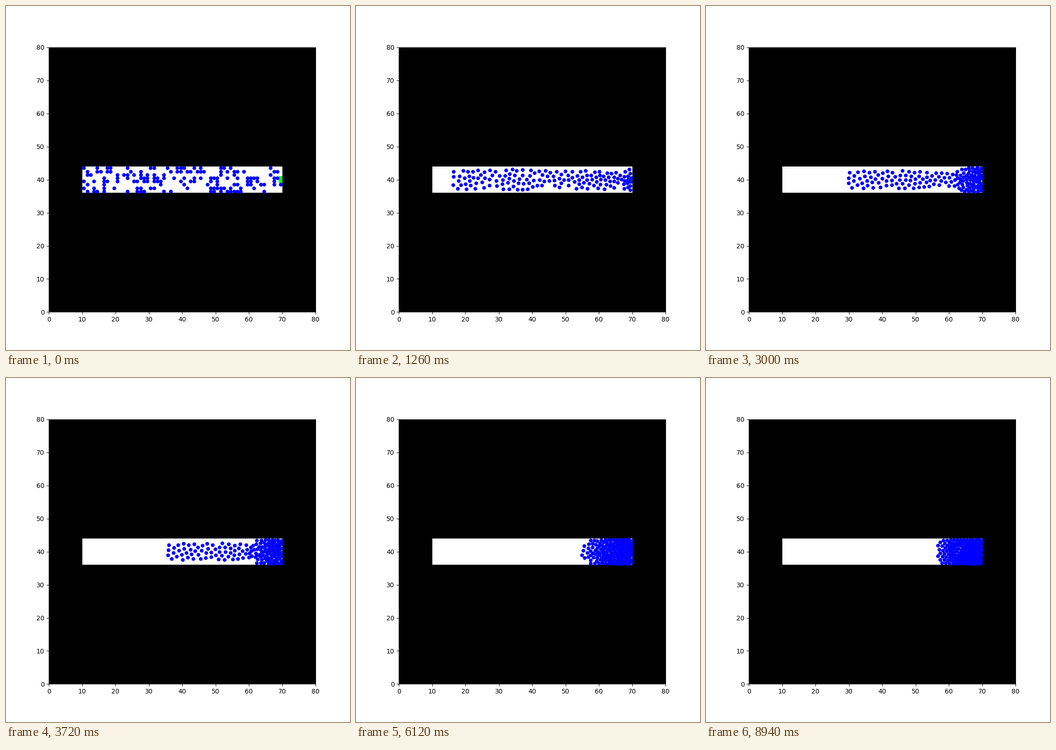
A matplotlib script for the animation above (9 s loop, 748x748 px).

```python
import matplotlib.pyplot as plt
import numpy as np
from matplotlib.animation import FuncAnimation
from matplotlib.patches import Rectangle

FRAMES, INTERVAL = 150, 60
SUBSTEPS = 8
STAGE = 748
LEFT, RIGHT, BOTTOM, TOP = 10, 70, 36, 44
GOAL = np.array([70.0, 40.0])

AGENTS = 147
SPEED = 0.495                 # cells per frame
RELAX = 9.2                   # frames needed to reach walking speed
DRIVE = SPEED / RELAX
BODY, BODY_RANGE = 1.12, 0.13
WALL, WALL_RANGE = 0.65, 0.12
EXIT_EVERY, EXIT_REACH = 8, 0.9


def push(dist, size, reach):
    return DRIVE * np.exp(np.minimum((size - dist) / reach, 5))


def wall_push(dist):
    return push(dist, WALL, WALL_RANGE)


def start_cells():
    rng = np.random.default_rng(7)
    width, height = RIGHT - LEFT, TOP - BOTTOM
    cells = rng.choice(width * height, AGENTS, replace=False)
    return np.column_stack([LEFT + 0.5 + cells % width,
                            BOTTOM + 0.5 + cells // width])


def acceleration(pos, vel):
    to_goal = GOAL - pos
    gap = np.linalg.norm(to_goal, axis=1, keepdims=True)
    acc = (SPEED * to_goal / np.maximum(gap, 0.3) - vel) / RELAX

    diff = pos[:, None] - pos[None]
    dist = np.sqrt((diff ** 2).sum(axis=2))
    np.fill_diagonal(dist, 1e6)
    force = push(dist, BODY, BODY_RANGE) / np.maximum(dist, 1e-3)
    acc += (force[..., None] * diff).sum(axis=1)

    x, y = pos.T
    acc[:, 0] += wall_push(x - LEFT) - wall_push(RIGHT - x)
    acc[:, 1] += wall_push(y - BOTTOM) - wall_push(TOP - y)
    return acc


def leave(pos, vel):
    """Let the agent standing in the exit walk out."""
    gap = np.linalg.norm(GOAL - pos, axis=1)
    stay = np.ones(len(pos), bool)
    if gap.min() < EXIT_REACH:
        stay[gap.argmin()] = False
    return pos[stay], vel[stay]


def simulate():
    pos = start_cells()
    vel = np.zeros_like(pos)
    path = [pos]
    dt = 1 / SUBSTEPS
    low, high = (LEFT + 0.3, BOTTOM + 0.3), (RIGHT - 0.3, TOP - 0.35)
    for frame in range(1, FRAMES):
        for _ in range(SUBSTEPS):
            vel = vel + dt * acceleration(pos, vel)
            pos = np.clip(pos + dt * vel, low, high)
        if frame % EXIT_EVERY == 0:
            pos, vel = leave(pos, vel)
        path.append(pos)
    return path


path = simulate()

fig = plt.figure(figsize=(STAGE / 100, STAGE / 100), dpi=100)
ax = fig.add_axes([93.2 / STAGE, 82.6 / STAGE, 580 / STAGE, 575.6 / STAGE])
ax.set_facecolor("black")
ax.set_xlim(0, 80)
ax.set_ylim(0, 80)
ax.add_patch(Rectangle((LEFT, BOTTOM), RIGHT - LEFT, TOP - BOTTOM, color="white", lw=0))
ax.add_patch(Rectangle((RIGHT - 1, 39), 1, 2, color="lime", lw=0))
dots, = ax.plot([], [], "o", color="blue", ms=5.9, mew=0)


def draw(i):
    dots.set_data(path[i][:, 0], path[i][:, 1])
    return dots,


anim = FuncAnimation(fig, draw, frames=FRAMES, interval=INTERVAL,
                     repeat=True, repeat_delay=0)
plt.show()
```
